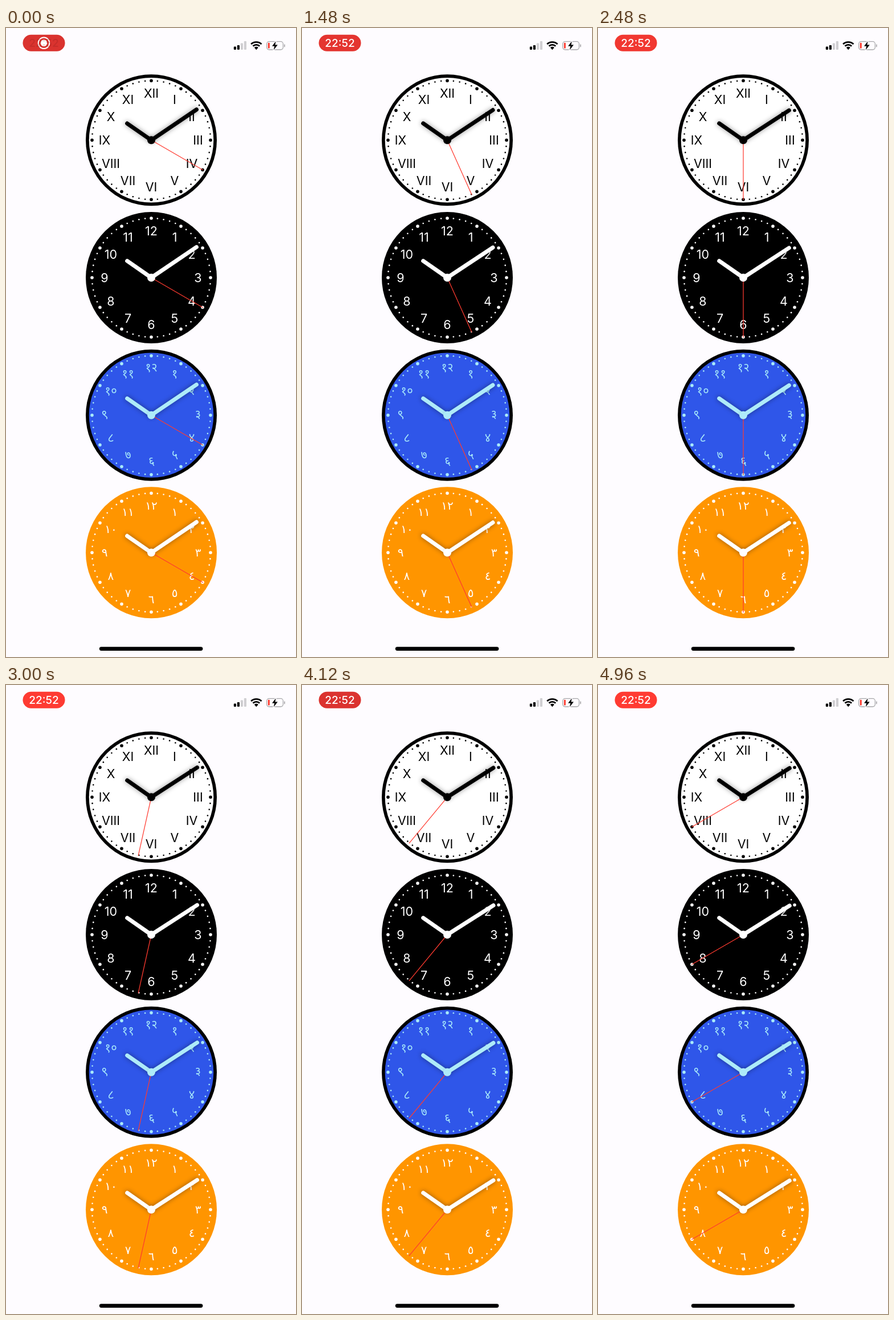
Recreate the animation shown at these times as an HTML page with a canvas. Size 509 by 1101 pixels, loop 5 s.

```html
<!DOCTYPE html>
<html lang="en">
<head>
<meta charset="utf-8">
<title>Clock faces</title>
<style>
html, body { margin: 0; width: 100%; height: 100%; overflow: hidden; background: #fefcff; }
canvas { display: block; width: 509px; height: 1101px; }
</style>
</head>
<body>
<canvas id="stage"></canvas>
<script>
const W = 509, H = 1101, LOOP = 5000, STEP = 40;
const TAU = Math.PI * 2;
const UI = 'Inter, "Liberation Sans", sans-serif';
const stage = document.getElementById('stage');
const dpr = window.devicePixelRatio || 1;
stage.width = W * dpr;
stage.height = H * dpr;
const c = stage.getContext('2d');
c.scale(dpr, dpr);

// Writes the hours 1-12 with digits starting at the given code point
const digits = zero => Array.from({ length: 12 }, (_, i) =>
  [...String(i + 1)].map(d => String.fromCharCode(zero + +d)).join(''));

const faces = [
  { y: 196.3, fill: '#fff', rim: '#000', ink: '#000', hand: '#000', font: '21.5px ' + UI,
    ref: 'X', hours: 'I II III IV V VI VII VIII IX X XI XII'.split(' ') },
  { y: 437, fill: '#000', rim: '#000', ink: '#fff', hand: '#fff', font: '21.5px ' + UI,
    ref: '0', hours: digits(0x30) },
  { y: 677.7, fill: '#2f56e9', rim: '#000', ink: '#a9ebfa', hand: '#aeebf9',
    font: '20px "Noto Sans Devanagari", "Noto Sans", sans-serif',
    ref: '\u0967\u0968', hours: digits(0x966) },
  { y: 918.3, fill: '#ff9500', rim: '#ff9500', ink: '#fff', hand: '#fff',
    font: '20px "DejaVu Sans", sans-serif',
    ref: '\u0661\u0662', hours: digits(0x660) }
];

function disc(x, y, r, color) {
  c.fillStyle = color;
  c.beginPath();
  c.arc(x, y, r, 0, TAU);
  c.fill();
}

function box(x, y, w, h, r, color) {
  c.fillStyle = color;
  c.beginPath();
  c.roundRect(x, y, w, h, r);
  c.fill();
}

function poly(points, color) {
  c.fillStyle = color;
  c.beginPath();
  points.forEach(([x, y]) => c.lineTo(x, y));
  c.closePath();
  c.fill();
}

const polar = (deg, r) => [r * Math.sin(deg * TAU / 360), -r * Math.cos(deg * TAU / 360)];

function hand(deg, length, width, color) {
  c.strokeStyle = color;
  c.lineWidth = width;
  c.beginPath();
  c.moveTo(0, 0);
  c.lineTo(...polar(deg, length));
  c.stroke();
}

function drawFace(f, seconds) {
  c.save();
  c.translate(255, f.y);
  disc(0, 0, 115, f.rim);
  disc(0, 0, 109.3, f.fill);
  for (let i = 0; i < 60; i++) {
    disc(...polar(i * 6, 104), i % 5 ? 1.3 : 2.8, f.ink);
  }

  c.font = f.font;
  c.textAlign = 'center';
  c.textBaseline = 'alphabetic';
  c.fillStyle = f.ink;
  const m = c.measureText(f.ref);
  const drop = (m.actualBoundingBoxAscent - m.actualBoundingBoxDescent) / 2;
  f.hours.forEach((text, i) => {
    const [x, y] = polar((i + 1) * 30, 82);
    c.fillText(text, x, y + drop);
  });

  c.lineCap = 'round';
  c.shadowColor = 'rgba(0,0,0,.42)';
  c.shadowBlur = 8 * dpr;
  hand(seconds / 120, 51.5, 7, f.hand);
  hand(seconds / 10, 95.8, 7, f.hand);
  c.shadowColor = 'transparent';
  c.lineCap = 'butt';
  hand(seconds * 6, 105, 1.25, '#ff3b30');
  disc(0, 0, 7, f.hand);
  c.restore();
}

function drawPill(t) {
  const glow = (1 - Math.cos((t + 180) / 2050 * TAU)) / 2;
  const mix = (a, b) => Math.round(a + (b - a) * glow);
  box(29.5, 11.8, 74, 29, 14.5, `rgb(${mix(215, 255)},${mix(50, 59)},${mix(47, 50)})`);

  // The record symbol gives way to the time
  const k = Math.min(1, t / 300);
  c.globalAlpha = 1 - k;
  c.strokeStyle = '#fff';
  c.lineWidth = 2;
  c.beginPath();
  c.arc(66.5, 26.3, 9.8, 0, TAU);
  c.stroke();
  disc(66.5, 26.3, 5.8, '#fff');
  c.globalAlpha = 0.25 + 0.75 * k;
  c.font = '500 19px ' + UI;
  c.textAlign = 'center';
  c.textBaseline = 'alphabetic';
  c.fillStyle = k ? '#fff' : '#8c1c1a';
  if (k) c.globalAlpha = k;
  c.fillText('22:52', 66.5, 33.2);
  c.globalAlpha = 1;
}

function drawStatus() {
  [5.5, 8, 11.5, 15].forEach((h, i) =>
    box(399.8 + i * 6, 38 - h, 4.2, h, 1.2, i < 2 ? '#000' : '#d0cfd2'));

  const wedge = Math.PI / 4.1, up = -Math.PI / 2;
  c.strokeStyle = '#000';
  c.lineWidth = 2.9;
  for (const r of [13.2, 8.4]) {
    c.beginPath();
    c.arc(439.3, 37.8, r, up - wedge, up + wedge);
    c.stroke();
  }
  c.fillStyle = '#000';
  c.beginPath();
  c.moveTo(439.3, 38.2);
  c.arc(439.3, 37.8, 5, up - wedge, up + wedge);
  c.fill();

  c.strokeStyle = '#a8a7aa';
  c.lineWidth = 1.3;
  c.beginPath();
  c.roundRect(457.6, 23.6, 28.8, 14.4, 4.4);
  c.stroke();
  box(488, 28.4, 1.7, 5, 1, '#a8a7aa');
  box(459.8, 25.8, 3, 10, 1.4, '#ff3b30');

  const bolt = [[473.6, 23.2], [467, 31.8], [471.2, 31.8], [469.8, 38.4], [476.8, 29.4], [472.4, 29.4]];
  c.strokeStyle = '#fefcff';
  c.lineWidth = 2.6;
  c.beginPath();
  bolt.forEach(p => c.lineTo(...p));
  c.closePath();
  c.stroke();
  poly(bolt, '#000');
}

function draw(t) {
  c.fillStyle = '#fefcff';
  c.fillRect(0, 0, W, H);
  drawPill(t);
  drawStatus();
  // Starts at 10:09:20 and covers twenty seconds in a loop
  const seconds = 10 * 3600 + 9 * 60 + 20 + 20 * t / (LOOP - STEP);
  faces.forEach(f => drawFace(f, seconds));
  box(163.8, 1083.2, 181.6, 6.8, 3.4, '#000');
}

const start = performance.now();
function tick() {
  const t = (performance.now() - start) % LOOP;
  draw(Math.floor(t / STEP) * STEP);
  requestAnimationFrame(tick);
}
tick();
</script>
</body>
</html>
```
